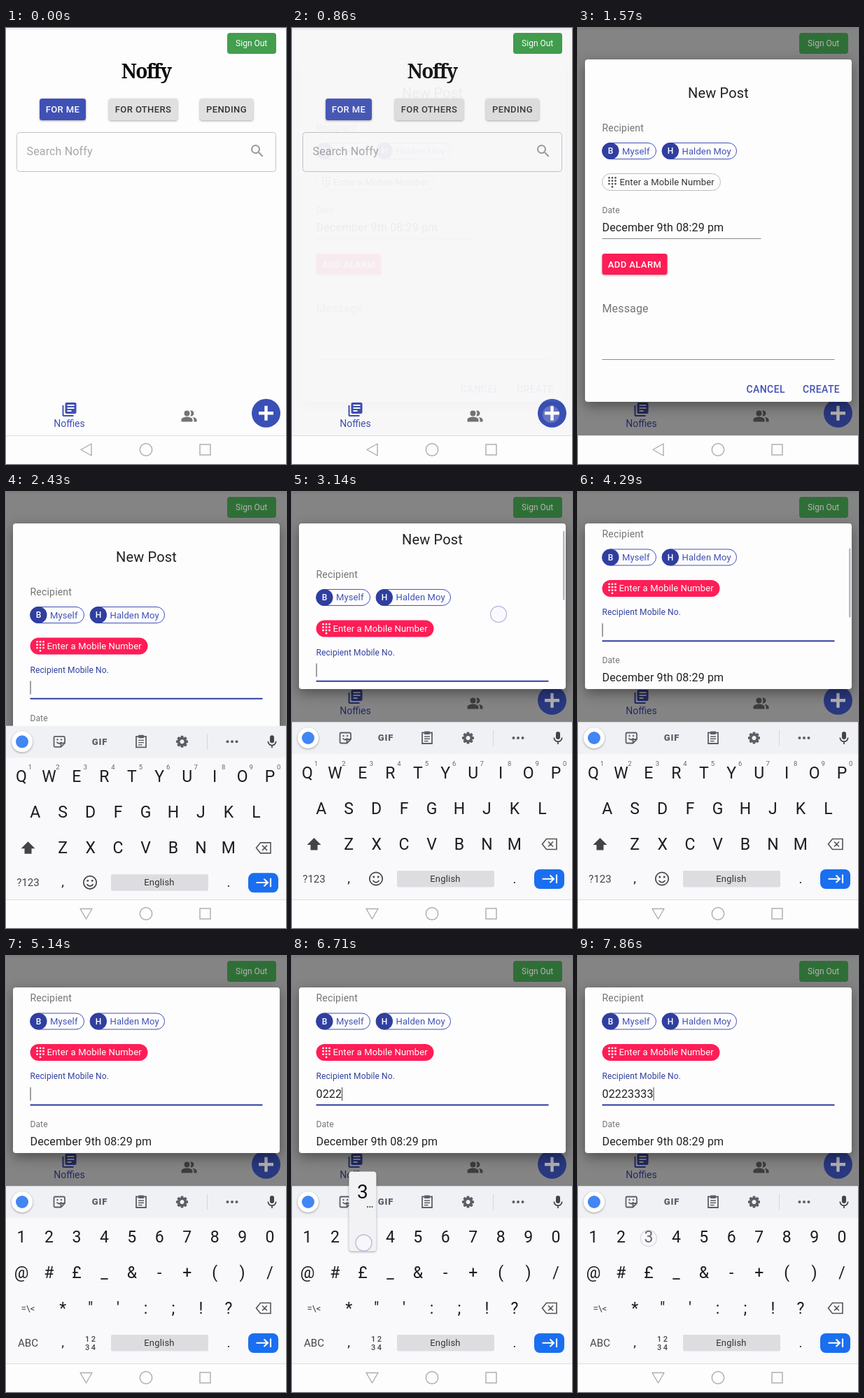
Write an HTML page that moves like this. It is 400 px wide and 624 px high and loops after 8000 ms.

```html
<!DOCTYPE html>
<html lang="en">
<head>
<meta charset="utf-8">
<title>New post</title>
<style>
  html, body { margin: 0; width: 100%; height: 100%; overflow: hidden; background: #fefdfe; }
  #stage { display: block; width: 100vw; height: 100vh; }
  text { font-family: Roboto, "Open Sans", sans-serif; white-space: pre; }
  .btn { font-size: 13px; font-weight: 500; letter-spacing: .4px; }
  .act { font-size: 14px; font-weight: 500; letter-spacing: .4px; }
  .chip { font-size: 13px; letter-spacing: .13px; }
  .body { font-size: 16px; letter-spacing: .15px; }
  .small { font-size: 12px; letter-spacing: .11px; }
  .key { font-size: 23px; fill: #1c1c1e; }
  .raise { filter: drop-shadow(0 1.5px 1.5px rgba(0, 0, 0, .35)); }
  .logo { font-family: "Noto Serif", serif; font-weight: 900; font-size: 28px; letter-spacing: -1.5px; }
</style>
</head>
<body>
<svg id="stage" viewBox="0 0 400 624" preserveAspectRatio="none"></svg>
<script>
const LOOP = 8000;
const BLUE = '#3f51b5', NAVY = '#303f9f', RED = '#ff1d56', GREY = '#757575', ICON = '#5b5f65';
const NUMBER = '02223333';
const KEY_UP = [5440, 5820, 6130, 6420, 6780, 7130, 7470, 7800];
const HOLD = 150, FADE = 120;
const DIALOG_AT = 850, CHIP_AT = 2030, KEYS_AT = 2250, RESIZE_AT = 2500, DIGITS_AT = 4850;

const text = (x, y, s, fill, cls = '', extra = '') =>
  `<text x="${x}" y="${y}" fill="${fill}" class="${cls}" ${extra}>${s}</text>`;
const mid = (x, y, s, fill, cls = '', extra = '') =>
  text(x, y, s, fill, cls, 'text-anchor="middle" ' + extra);
const rect = (x, y, w, h, r, fill, extra = '') =>
  `<rect x="${x}" y="${y}" width="${w}" height="${h}" rx="${r}" fill="${fill}" ${extra}/>`;
const disc = (x, y, r, fill, extra = '') =>
  `<circle cx="${x}" cy="${y}" r="${r}" fill="${fill}" ${extra}/>`;
const line = (x1, x2, y, color, w = 1) =>
  `<path d="M${x1} ${y}H${x2}" stroke="${color}" stroke-width="${w}"/>`;
const icon = (x, y, d, fill, extra = '') =>
  `<path transform="translate(${x} ${y})" d="${d}" fill="${fill}" ${extra}/>`;
const stroke = (d, color, w = 1.8, extra = '') =>
  `<path d="${d}" fill="none" stroke="${color}" stroke-width="${w}" ${extra}/>`;
const button = (x, y, w, h, fill, label, color) =>
  rect(x, y, w, h, 3.5, fill, 'class="raise"') + mid(x + w / 2, y + h / 2 + 4.7, label, color, 'btn');
const keyX = i => 22 + i * 39.45;

const SEARCH = 'M15.5 14h-.79l-.28-.27A6.47 6.47 0 0 0 16 9.5 6.5 6.5 0 1 0 9.5 16c1.61 0 3.09-.59 4.23-1.57l.27.28v.79l5 4.99L20.49 19l-4.99-5zm-6 0C7.01 14 5 11.99 5 9.5S7.01 5 9.5 5 14 7.01 14 9.5 11.99 14 9.5 14z';
const BOOKS = 'M4 6H2v14c0 1.1.9 2 2 2h14v-2H4V6zm16-4H8c-1.1 0-2 .9-2 2v12c0 1.1.9 2 2 2h12c1.1 0 2-.9 2-2V4c0-1.1-.9-2-2-2zm-1 9H9V9h10v2zm-4 4H9v-2h6v2zm4-8H9V5h10v2z';
const PEOPLE = 'M16.67 13.13C18.04 14.06 19 15.32 19 17v3h4v-3c0-2.18-3.57-3.47-6.33-3.87zM15 12c2.21 0 4-1.79 4-4s-1.79-4-4-4c-.47 0-.91.1-1.33.24C14.5 5.27 15 6.58 15 8s-.5 2.73-1.33 3.76c.42.14.86.24 1.33.24zM9 12a4 4 0 1 0 0-8 4 4 0 0 0 0 8zM9 13c-2.67 0-8 1.34-8 4v3h16v-3c0-2.66-5.33-4-8-4z';

function home() {
  return rect(0, 0, 400, 3, 0, '#f4f4f6') +
    mid(200, 72, 'Noffy', '#0b0b0b', 'logo') +
    button(48, 101, 66, 31, BLUE, 'FOR ME', '#fff') +
    button(147, 101, 98, 31, '#e0e0e0', 'FOR OTHERS', '#333') +
    button(277, 101, 76, 31, '#e0e0e0', 'PENDING', '#333') +
    rect(15.5, 149.5, 370, 56, 4, 'none', 'stroke="#c2c2c6"') +
    text(29.5, 182, 'Search Noffy', '#a8a8a8', 'body') +
    icon(347, 164, SEARCH, '#999');
}

function tabs() {
  return icon(78.5, 534, BOOKS, BLUE) +
    mid(90.5, 571, 'Noffies', BLUE, '', 'font-size="14"') +
    icon(249.5, 543.5, PEOPLE, GREY);
}

function contact(x, w, letter, name) {
  return rect(x, 164.5, w, 23, 11.5, 'none', `stroke="${BLUE}"`) +
    disc(x + 12, 176, 12, NAVY) +
    mid(x + 12, 180.3, letter, '#fff', '', 'font-size="12" font-weight="500"') +
    text(x + 28.5, 180.5, name, BLUE, 'chip');
}

function dialpad(color) {
  let s = disc(49, 227.3, 1.4, color);
  for (let i = 0; i < 9; i++) s += disc(44.5 + i % 3 * 4.5, 214.3 + Math.floor(i / 3) * 4.4, 1.4, color);
  return s;
}

function form() {
  const label = 'Enter a Mobile Number';
  return mid(200.5, 100, 'New Post', '#212121', '', 'font-size="20" letter-spacing=".15"') +
    text(34.5, 148, 'Recipient', GREY, '', 'font-size="14" letter-spacing=".2"') +
    contact(34.5, 77, 'B', 'Myself') + contact(120, 106.5, 'H', 'Halden Moy') +
    `<g id="chipOff">${rect(34.5, 208.5, 169, 24, 12, 'none', 'stroke="#bdbdbd"')}
      ${dialpad('#555')}${text(59.5, 225, label, '#333', 'chip')}</g>
    <g id="chipOn">${rect(34.5, 208.5, 168, 24, 12, RED)}${dialpad('#fff')}${text(58.5, 225, label, '#fff', 'chip')}
      ${text(34.5, 259, 'Recipient Mobile No.', NAVY, 'small')}
      <text id="value" x="34.5" y="285.5" fill="#222" class="body"></text>
      ${rect(0, 270.5, 1, 19, 0, '#444', 'id="caret"')}
      ${line(34.5, 366.5, 295.8, NAVY, 2)}</g>
    <g id="rest">` +
    text(34.5, 264.5, 'Date', GREY, 'small') +
    text(34.5, 290.5, 'December 9th 08:29 pm', '#222', 'body') +
    line(34.5, 261.5, 301.5, '#8a8a8a') +
    button(34.5, 323, 93, 30, RED, 'ADD ALARM', '#fff') +
    text(34.5, 406.5, 'Message', GREY, 'body') +
    line(34.5, 366.5, 474.5, '#8a8a8a') +
    text(240.5, 522, 'CANCEL', BLUE, 'act') + text(321, 522, 'CREATE', BLUE, 'act') + '</g>';
}

function toolbar() {
  let gear = '';
  for (let a = 0; a < 360; a += 45) gear += rect(249.5, 343.5, 4, 5, 1, ICON, `transform="rotate(${a} 251.5 352)"`);
  return rect(0, 329.5, 400, 45.5, 0, '#f0f1f5') +
    disc(23, 352, 15, '#fff', 'class="raise"') + disc(23, 352, 9, '#4285f4') +
    stroke('M70 344.5H82Q84 344.5 84 346.5V354L78.500 359.500H70Q68.500 359.500 68.500 358V346Q68.500 344.500 70 344.500ZM84 354H78.500V359.500M72.500 352.500Q75.500 356.500 79.500 352.500', ICON) +
    disc(73.5, 349, 1.2, ICON) + disc(79, 349, 1.2, ICON) +
    mid(134, 356.3, 'GIF', ICON, '', 'font-size="13" font-weight="900" letter-spacing=".8"') +
    stroke('M186 344.500H200V360H186Z', ICON) + rect(189, 342.5, 8, 4.5, 1, ICON) +
    stroke('M189 350H197M189 353.300H197M189 356.500H194.500', ICON, 1.4) +
    gear + stroke('M246.700 352a4.800 4.800 0 1 0 9.600 0a4.800 4.800 0 1 0 -9.600 0', ICON, 3.6) +
    stroke('M287.500 341V363', '#d5d6da', 1) +
    [316.5, 323, 329.5].map(x => disc(x, 352, 2, ICON)).join('') +
    rect(377, 343, 6, 11, 3, '#444') + stroke('M374.300 351.500a5.700 5.700 0 0 0 11.400 0M380 357V361', '#444', 1.7);
}

const row = (chars, first, y) =>
  [...chars].map((c, i) => mid(keyX(first + i), y, c === '<' ? '&lt;' : c === '&' ? '&amp;' : c, '#1c1c1e', 'key')).join('');

function keyboard() {
  const hints = [...'1234567890'].map((c, i) => mid(keyX(i) + 12.5, 391.5, c, '#666', '', 'font-size="9.5"')).join('');
  const side = (s, y, size = 15) => mid(31.5, y, s, '#444', '', `font-size="${size}"`);
  return rect(0, 329.5, 400, 254, 0, '#f9f9fc') + toolbar() +
    `<g id="letters">${row('QWERTYUIOP', 0, 410)}${hints}${row('ASDFGHJKL', .5, 461)}${row('ZXCVBNM', 1.5, 512)}
      <path d="M31.500 495L41.500 505H36.500V512.500H26.500V505H21.500Z" fill="#444"/>${side('?123', 559)}
      ${stroke('M110.800 553.500a9.200 9.200 0 1 0 18.400 0a9.200 9.200 0 1 0 -18.400 0M115.500 556Q120 561.500 124.500 556', '#444', 1.7)}
      ${disc(116.8, 551, 1.4, '#444')}${disc(123.2, 551, 1.4, '#444')}</g>
    <g id="digits">${row('1234567890', 0, 410)}${row('@#£_&-+()/', 0, 461)}${row('*"\':;!?', 1.5, 512)}
      ${side('=\\&lt;', 508.5, 13.5)}${side('ABC', 559)}
      ${mid(120.5, 552, '1 2', '#444', '', 'font-size="11" font-weight="500"')}
      ${mid(120.5, 563.5, '3 4', '#444', '', 'font-size="11" font-weight="500"')}</g>` +
    stroke('M363.500 496.500H378V511.500H363.500L357.500 504ZM366 500.500L373 507.500M373 500.500L366 507.500', '#555', 1.6) +
    mid(81, 559, ',', '#222', '', 'font-size="19"') + mid(318, 560, '.', '#222', '', 'font-size="19"') +
    rect(150, 542, 139, 23.5, 2, '#dddde1') + mid(219, 558, 'English', '#333', '', 'font-size="13" letter-spacing=".2"') +
    rect(346, 540, 43, 28, 8, '#1a6ff0') +
    stroke('M357.500 553.700H373.500M368.500 548.500L374 553.700L368.500 559M378 547.500V560', '#fff', 2.1);
}

const stage = document.getElementById('stage');
stage.innerHTML = rect(0, 0, 400, 624, 0, '#fefdfe') + home() +
  `<g id="tabs">${tabs()}</g>` +
  rect(0, 0, 400, 583, 0, '#000', 'id="shade"') +
  `<g class="lit">${rect(316, 7, 70, 30, 4, '#439e4e')}${mid(350.7, 26, 'Sign Out', '#fff', '', 'font-size="12"')}</g>
  <g id="fab"><g class="lit">${disc(371.5, 551.3, 20.5, '#3a50b6')}${stroke('M361 551.300H382M371.500 540.800V561.800', '#fff', 4.4)}</g></g>
  <g id="dialog">
    ${rect(10, 45, 381, 490, 4, '#fefdfe', 'id="paper" style="filter:drop-shadow(0 6px 9px rgba(0,0,0,.4))"')}
    <svg id="window" x="10" y="45" width="381" height="490"><g id="content">${form()}</g></svg>
    ${rect(387, 45, 2.6, 99, 1.3, '#b9b9bd', 'id="thumb"')}
  </g>
  <g id="keyboard">${keyboard()}</g>
  ${rect(0, 583, 400, 41, 0, '#fefdfe')}${line(0, 400, 583.5, '#dedee0')}
  <path id="back" fill="none" stroke="#acacae" stroke-width="1.4" stroke-linejoin="round"/>
  ${disc(200, 603.5, 8.7, 'none', 'stroke="#acacae" stroke-width="1.4"')}
  ${rect(277, 596, 15, 15, 0, 'none', 'stroke="#acacae" stroke-width="1.4"')}
  <g id="popup">${rect(-19.5, 308.5, 39, 114, 4, '#f2f2f5', 'class="raise"')}
    <text id="digit" y="347" font-size="28" text-anchor="middle" fill="#111"></text>
    ${[7, 10.3, 13.6].map(x => disc(x, 359, .9, '#222')).join('')}</g>
  ${disc(0, 0, 11.5, 'rgba(246,246,255,.72)', 'id="touch" stroke="#b9bbd6" stroke-width="1.4"')}`;

const el = {};
stage.querySelectorAll('[id]').forEach(n => el[n.id] = n);
const lit = stage.querySelectorAll('.lit');

const clamp = (v, a = 0, b = 1) => Math.min(b, Math.max(a, v));
const ease = p => 1 - (1 - p) ** 3;
const ramp = (t, from, to) => clamp((t - from) / (to - from));
const show = (node, on) => node.setAttribute('display', on ? 'inline' : 'none');
const move = (node, x, y) => node.setAttribute('transform', `translate(${x} ${y})`);
const digitX = i => keyX((+NUMBER[i] + 9) % 10);

// Each touch: down, up, x, y
const touches = [
  [590, 780, 370, 553], [1870, 2010, 150, 221], [3000, 3860, 295, 175], [4700, 4870, 43, 554],
  ...KEY_UP.map((up, i) => [up - HOLD, up, digitX(i) + (i < 7 ? 1.6 : 0), i < 7 ? 410.5 : 404])
];

function drawTouch(t) {
  const hit = touches.find(([down, up]) => t >= down && t < up + FADE);
  show(el.touch, hit);
  if (!hit) return;
  let [down, up, x, y] = hit;
  if (down === 3000) {
    const d = (Math.min(t, up) - 3140) / 570;
    x += 9 * d;
    y -= 39 * d;
  }
  move(el.touch, x, y);
  el.touch.setAttribute('opacity', 1 - ramp(t, up, up + FADE));
}

function draw(t) {
  const open = ramp(t, DIALOG_AT, DIALOG_AT + 225);
  const chosen = t >= CHIP_AT, resized = t >= RESIZE_AT;

  el.shade.setAttribute('opacity', .48 * open);
  lit.forEach(n => n.style.filter = `brightness(${1 - .3 * open})`);
  el.dialog.setAttribute('opacity', open);
  show(el.dialog, open > 0);

  const lift = resized ? -253 : 0;
  move(el.tabs, 0, lift);
  move(el.fab, 0, lift);
  el.paper.setAttribute('height', resized ? 237 : 490);
  el.window.setAttribute('height', resized ? 237 : 490);

  const drag = 25 + (clamp(t, 3000, 3860) - 3140) * 43 / 570;
  const scroll = resized ? drag + 3.2 * ease(ramp(t, 3860, 4000)) : 0;
  move(el.content, -10, -45 - scroll);
  move(el.rest, 0, chosen ? 63.5 : 0);
  show(el.chipOff, !chosen);
  show(el.chipOn, chosen);
  el.thumb.setAttribute('y', 45 + scroll * .43);
  el.thumb.setAttribute('opacity', t < 3000 ? 0 : 1 - ramp(t, 4300, 4600));

  const typed = KEY_UP.filter(up => t >= up).length;
  el.value.textContent = NUMBER.slice(0, typed);
  el.caret.setAttribute('x', 34.5 + typed * 9.13);
  show(el.caret, typed > 0 || t % 1000 < 500);

  const rise = ease(ramp(t, KEYS_AT, RESIZE_AT));
  show(el.keyboard, rise > 0);
  move(el.keyboard, 0, 254 * (1 - rise));
  show(el.letters, t < DIGITS_AT);
  show(el.digits, t >= DIGITS_AT);
  el.back.setAttribute('d', t < KEYS_AT ? 'M107 603.500L122 595V612Z' : 'M106 596.500H123L114.500 611Z');

  const held = KEY_UP.findIndex(up => t >= up - HOLD && t < up + 30);
  show(el.popup, held >= 0);
  if (held >= 0) {
    move(el.popup, digitX(held), 0);
    el.digit.textContent = NUMBER[held];
  }
  drawTouch(t);
}

function frame() {
  draw(performance.now() % LOOP);
  requestAnimationFrame(frame);
}
frame();
</script>
</body>
</html>
```
